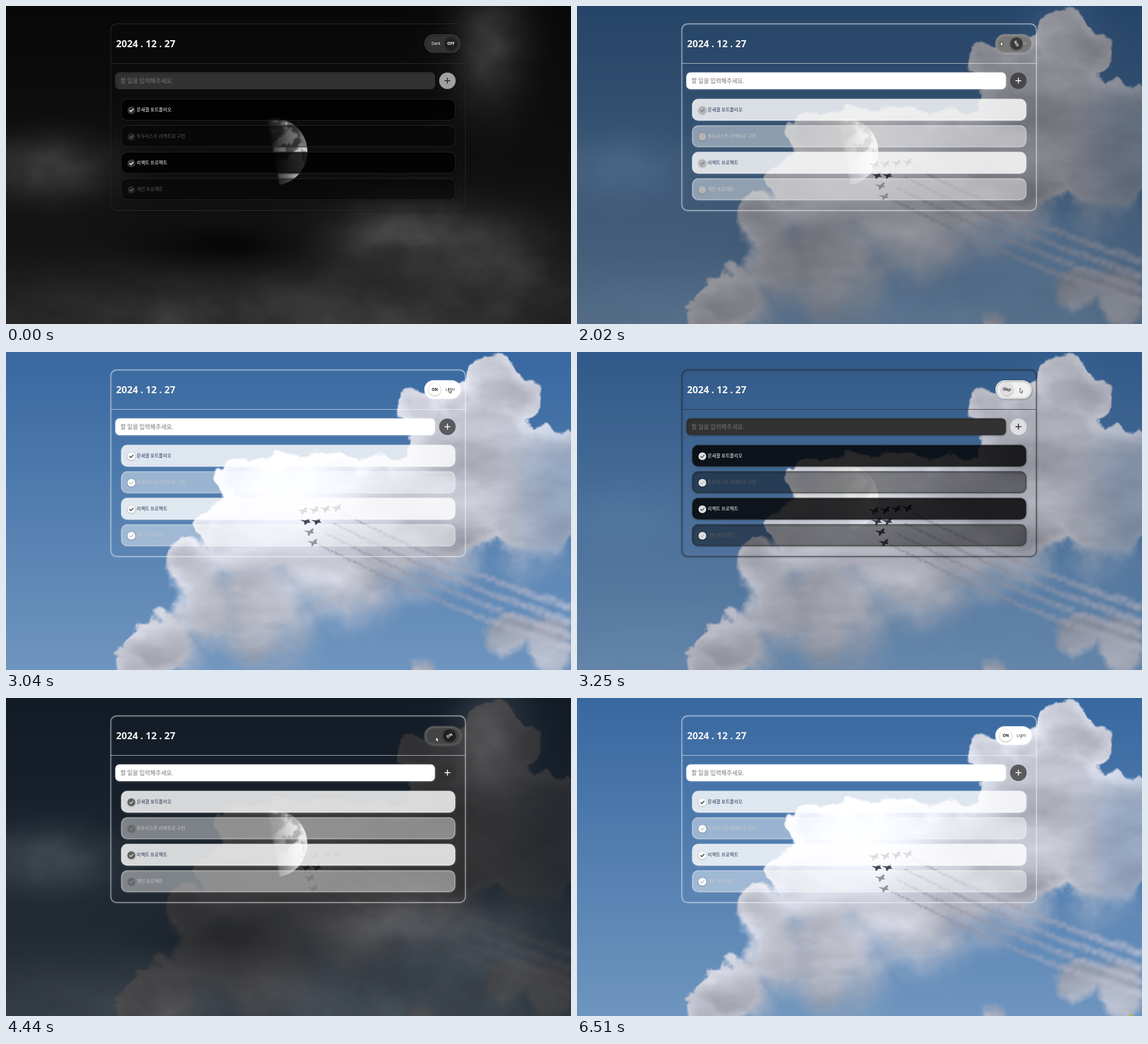
An HTML page with a canvas for the animation above (6.6 s loop, 960 px wide and 540 px high).

```html
<!DOCTYPE html>
<html lang="ko">
<head>
<meta charset="utf-8">
<title>Todo theme switch</title>
<style>
  html, body { margin: 0; width: 100%; height: 100%; overflow: hidden; background: #0b0b0b; }
  canvas { display: block; width: 960px; height: 540px; }
</style>
</head>
<body>
<canvas id="stage" width="960" height="540"></canvas>
<script>
const W = 960, H = 540, LOOP = 6600;
const ctx = document.getElementById('stage').getContext('2d');
const KR = '"Noto Sans CJK KR", "Noto Sans CJK", sans-serif';
const LATIN = '"Noto Sans", sans-serif';

const lerp = (a, b, t) => a + (b - a) * t;
const smooth = (a, b, v) => {
  const t = Math.min(1, Math.max(0, (v - a) / (b - a)));
  return t * t * (3 - 2 * t);
};
const bell = (x, y, cx, cy, rx, ry) => Math.exp(-(((x - cx) / rx) ** 2) - ((y - cy) / ry) ** 2);
const gray = (v, a = 1) => `rgba(${v | 0},${v | 0},${v | 0},${a})`;

function random(seed) {
  return () => {
    seed = (seed * 1664525 + 1013904223) >>> 0;
    return seed / 4294967296;
  };
}

const rnd = random(11);
const lattice = Float32Array.from({ length: 4096 }, rnd);

function noise(x, y) {
  const xi = Math.floor(x), yi = Math.floor(y);
  const u = x - xi, v = y - yi;
  const su = u * u * (3 - 2 * u), sv = v * v * (3 - 2 * v);
  const x0 = xi & 63, x1 = (xi + 1) & 63, y0 = (yi & 63) << 6, y1 = ((yi + 1) & 63) << 6;
  return lerp(lerp(lattice[y0 | x0], lattice[y0 | x1], su), lerp(lattice[y1 | x0], lattice[y1 | x1], su), sv);
}

// Layered noise centred on zero.
function fbm(x, y) {
  let sum = 0;
  for (let i = 0, amp = 0.5; i < 5; i++, amp /= 2) {
    sum += (noise(x, y) - 0.5) * amp;
    x = x * 2 + 7.3;
    y = y * 2 + 3.1;
  }
  return sum;
}

function paintLayer(shade) {
  const c = document.createElement('canvas');
  c.width = W;
  c.height = H;
  const g = c.getContext('2d');
  const image = g.createImageData(W, H);
  for (let y = 0, i = 0; y < H; y++) {
    for (let x = 0; x < W; x++, i += 4) {
      const [r, gr, b] = shade(x, y);
      image.data[i] = r;
      image.data[i + 1] = gr;
      image.data[i + 2] = b;
      image.data[i + 3] = 255;
    }
  }
  g.putImageData(image, 0, 0);
  return g;
}

// Round lobes (x, y, radius) whose union is the outline of the clouds.
const BODY = [
  [415, 226, 52], [470, 242, 64], [555, 215, 61], [418, 320, 95], [322, 365, 55], [352, 430, 68],
  [266, 500, 57], [215, 546, 38], [560, 320, 130], [430, 425, 95], [640, 292, 110],
  [706, 100, 36], [765, 86, 42], [828, 66, 53], [868, 78, 50], [800, 195, 130], [890, 235, 115], [720, 270, 110]];
const CORNER = [[850, 482, 40], [925, 500, 48], [700, 546, 18]];

function distance(lobes, x, y) {
  let d = 999;
  for (const [cx, cy, r] of lobes) d = Math.min(d, Math.hypot(x - cx, y - cy) - r);
  return d;
}

function dayShade(x, y) {
  const v = y / H, rough = fbm(x / 42, y / 42) * 60;
  const low = smooth(300, 400, y) * smooth(240, 420, x);
  const soft = 3 + 60 * low;
  const body = distance(BODY, x, y) + rough;
  const corner = distance(CORNER, x, y) + rough;
  const thin = 1 - 0.35 * smooth(830, 930, x) * smooth(90, 200, y);
  const cover = Math.max((1 - smooth(-soft, soft, body)) * thin, (1 - smooth(-16, 6, corner)) * 0.85);
  const white = bell(x, y, 465, 235, 185, 100);
  const rim = 20 * smooth(-35, 0, body) * (1 - low);
  const tone = 184 + 68 * white + fbm(x / 130 + 9, y / 65 + 5) * 100 * (1 - white) + rim - 8 * low;
  return [
    lerp(lerp(56, 110, v), tone, cover),
    lerp(lerp(104, 149, v), tone + 2, cover),
    lerp(lerp(160, 191, v), tone + 14, cover)];
}

// x, y, width, height, brightness of the night cloud banks
const BANKS = [
  [820, 70, 60, 90, 46], [60, 275, 120, 50, 36], [680, 385, 120, 50, 46],
  [830, 430, 150, 70, 28], [480, 525, 480, 75, 32], [370, 410, 130, 35, -14]];

function nightShade(x, y) {
  const grain = 1 + 1.5 * fbm(x / 95 + 20, y / 70);
  let tone = lerp(8, 22, y / H);
  for (const [cx, cy, rx, ry, gain] of BANKS) tone += gain * grain * bell(x, y, cx, cy, rx, ry);

  // Half moon: lit from the right, dark plains from noise.
  const depth = x - 444 - (y - 191) * 0.18;
  const disc = 1 - smooth(56, 58, Math.hypot(x - 454.5, y - 247));
  if (disc > 0 && depth > -3) {
    const plains = smooth(-0.06, 0.1, fbm(x / 17, y / 17) + (245 - y) / 500);
    const lit = lerp(70, 212, smooth(-5, 52, depth)) * (1 - 0.55 * plains * smooth(58, 45, depth));
    tone = lerp(tone, lit, disc * smooth(-3, 4, depth));
  }
  return [tone, tone, tone];
}

function puff(g, x, y, r, rgb, alpha) {
  const fill = g.createRadialGradient(x, y, 0, x, y, r);
  fill.addColorStop(0, `rgba(${rgb},${alpha})`);
  fill.addColorStop(1, `rgba(${rgb},0)`);
  g.fillStyle = fill;
  g.fillRect(x - r, y - r, 2 * r, 2 * r);
}

function trail(g, x0, y0, x1, y1) {
  for (let s = 0; s < 1; s += 0.004) {
    const width = lerp(2, 12, s), shade = lerp(118, 200, s);
    puff(g, lerp(x0, x1, s) + rnd() * 4, lerp(y0, y1, s) + 10 * Math.sin(Math.PI * s) + (rnd() - 0.5) * width,
      width * 0.6 + 1.5, `${shade},${shade},${shade + 18}`, 0.22);
  }
}

function jet(g, x, y) {
  g.fillStyle = '#42434f';
  g.beginPath();
  [[-9, -3], [0, -2], [5, -6], [8, -6], [6, -1], [9, 2], [3, 2], [0, 6], [-2, 6], [-2, 1]]
    .forEach(([dx, dy]) => g.lineTo(x + dx, y + dy));
  g.fill();
}

const day = paintLayer(dayShade);
for (let i = 0; i < 4; i++) {
  trail(day, 529 + 13 * i, 327 - 18 * i, 960, 506 - 24 * i);
  jet(day, 504 + 19 * i, 270 - 1.6 * i);
  jet(day, i < 3 ? 509 + 6 * i : 527, i < 3 ? 288 + 18 * i : 288);
}
const night = paintLayer(nightShade);

const START = 1166, TICK = 204, POINTER_END = 5450;
const hold = t => t < START ? 0 : t - (t - START) % TICK;
const CLICKS = [1806, 3134, 4346];

// Each click runs the change from night to day or back.
function progress(t, duration) {
  const [on, off, again] = CLICKS.map(c => smooth(c, c + duration, t));
  return on - off + again;
}

// Pointer stops: time, x, y
const PATH = [
  [1166, 843, 50], [1370, 734, 22], [1574, 719, 60], [2390, 719, 60], [2798, 752, 61], [3614, 752, 61],
  [4022, 729, 64], [4430, 730, 66], [4634, 734, 86], [5042, 880, 493], [5246, 917, 528]];

function pointerAt(t) {
  const next = PATH.findIndex(p => p[0] > t);
  if (next < 0) return PATH.at(-1).slice(1);
  const [t0, x0, y0] = PATH[next - 1], [t1, x1, y1] = PATH[next];
  const s = (t - t0) / (t1 - t0);
  return [lerp(x0, x1, s), lerp(y0, y1, s)];
}

function box(x, y, w, h, r, fill, edge, glow) {
  ctx.save();
  ctx.beginPath();
  ctx.roundRect(x, y, w, h, r);
  ctx.fillStyle = fill;
  ctx.fill();
  ctx.strokeStyle = edge;
  ctx.lineWidth = 1.2;
  ctx.shadowColor = glow;
  ctx.shadowBlur = 3;
  ctx.shadowOffsetX = ctx.shadowOffsetY = 0.6;
  ctx.stroke();
  ctx.restore();
}

function disc(x, y, r, fill, shadow = 'transparent') {
  ctx.save();
  ctx.shadowColor = shadow;
  ctx.shadowBlur = 3;
  ctx.shadowOffsetY = 0.7;
  ctx.fillStyle = fill;
  ctx.beginPath();
  ctx.arc(x, y, r, 0, 7);
  ctx.fill();
  ctx.restore();
}

function line(pts, color, width) {
  ctx.strokeStyle = color;
  ctx.lineWidth = width;
  ctx.beginPath();
  pts.forEach(p => ctx.lineTo(...p));
  ctx.stroke();
}

function label(text, x, y, font, color, align = 'left') {
  ctx.font = font;
  ctx.fillStyle = color;
  ctx.textAlign = align;
  ctx.fillText(text, x, y);
}

const TODOS = ['문새결 포트폴리오', '투두리스트 리액트로 구현', '리액트 프로젝트', '개인 프로젝트'];

function drawTodo(text, i, light, sky, glow) {
  const y = 158.2 + 45 * i, mid = y + 18.3, done = i % 2;
  const edge = light ? gray(255, done ? 0.45 : 0.6) : gray(44, 0.7);
  box(196, y, 567, 36, 10, gray(light ? 255 : 0, done ? 0.43 : 0.82), edge, glow);
  ctx.globalAlpha = done && sky < 0.5 ? 0.55 : 1;
  disc(213, mid + 0.5, 6.6, gray(lerp(58, 253, sky)), gray(0, light ? 0.3 : 0.6));
  const tick = done ? lerp(170, 190, sky) : lerp(255, 45, sky);
  line([[209.8, mid + 0.5], [212.2, mid + 2.8], [216.4, mid - 1.8]], gray(tick), 1.3);
  ctx.globalAlpha = 1;
  const ink = done ? gray(light ? 200 : 92) : (light ? '#25304f' : '#fff');
  label(text, 222, mid + 2.7, `7.8px ${KR}`, ink);
}

function drawSwitch(travel, light, glow) {
  const knobX = lerp(756, 728.5, travel);
  box(711.5, 48.5, 60.5, 30.5, 15.2, gray(lerp(50, 255, travel)), gray(lerp(62, 255, travel)), glow);
  const caption = () => label(light ? 'Light' : 'Dark', light ? 747 : 723, 65.5,
    `6.7px ${LATIN}`, gray(lerp(255, 55, travel)));
  if (light) caption();
  disc(knobX, 63.8, 10.3, gray(lerp(32, 255, travel ** 2)), gray(0, lerp(0.8, 0.35, travel)));
  ctx.save();
  ctx.translate(knobX, 63.8);
  ctx.rotate((1 - travel) * Math.PI * 2);
  label(light ? 'ON' : 'OFF', 0, 2.4, `700 6.6px ${LATIN}`, gray(lerp(255, 20, travel ** 4)), 'center');
  ctx.restore();
  if (!light) caption();
}

function drawPointer(x, y) {
  ctx.save();
  ctx.translate(x + 0.5, y + 0.3);
  ctx.beginPath();
  [[0, 0], [0, 7.6], [1.7, 6.2], [3, 9], [4.2, 8.5], [3, 5.7], [5.3, 5.5]].forEach(p => ctx.lineTo(...p));
  ctx.closePath();
  ctx.fillStyle = '#fff';
  ctx.strokeStyle = '#222';
  ctx.lineWidth = 0.7;
  ctx.fill();
  ctx.stroke();
  ctx.restore();
}

function draw(time) {
  const t = hold(time);
  const sky = progress(t, 300), travel = progress(t, 450);
  const light = CLICKS.filter(c => c <= t).length % 2 === 1;

  ctx.drawImage(night.canvas, 0, 0);
  ctx.globalAlpha = sky;
  ctx.drawImage(day.canvas, 0, 0);
  ctx.globalAlpha = 1;

  const edge = light ? gray(255, 0.6) : gray(48, 0.8);
  const glow = light ? gray(255, 0.5) : gray(0, 0.6);
  box(178, 30.3, 602.5, 317, 10, 'transparent', edge, glow);
  line([[178, 97.5], [780, 97.5]], edge, 1);
  label('2024 . 12 . 27', 187, 69.7, `700 16.3px ${LATIN}`, '#f6f5f3');
  drawSwitch(travel, light, glow);

  box(186, 113, 542.5, 28, 7, gray(light ? 255 : 50), light ? gray(255, 0.6) : gray(62, 0.8), glow);
  label('할 일을 입력해주세요.', 194.5, 130.6, `10px ${KR}`, '#757575');

  disc(750, 127, 14, light ? gray(48, 0.72) : gray(255, 0.6));
  const plus = gray(light ? 255 : 40);
  line([[745, 126.8], [755, 126.8]], plus, 1.5);
  line([[750, 121.8], [750, 131.8]], plus, 1.5);

  TODOS.forEach((text, i) => drawTodo(text, i, light, sky, glow));
  if (t >= START && t < POINTER_END) drawPointer(...pointerAt(t));
  if (time >= 6510) disc(941.5, 543, 5.4, '#b4bd2c');
}

function frame() {
  draw(performance.now() % LOOP);
  requestAnimationFrame(frame);
}
frame();
</script>
</body>
</html>
```
